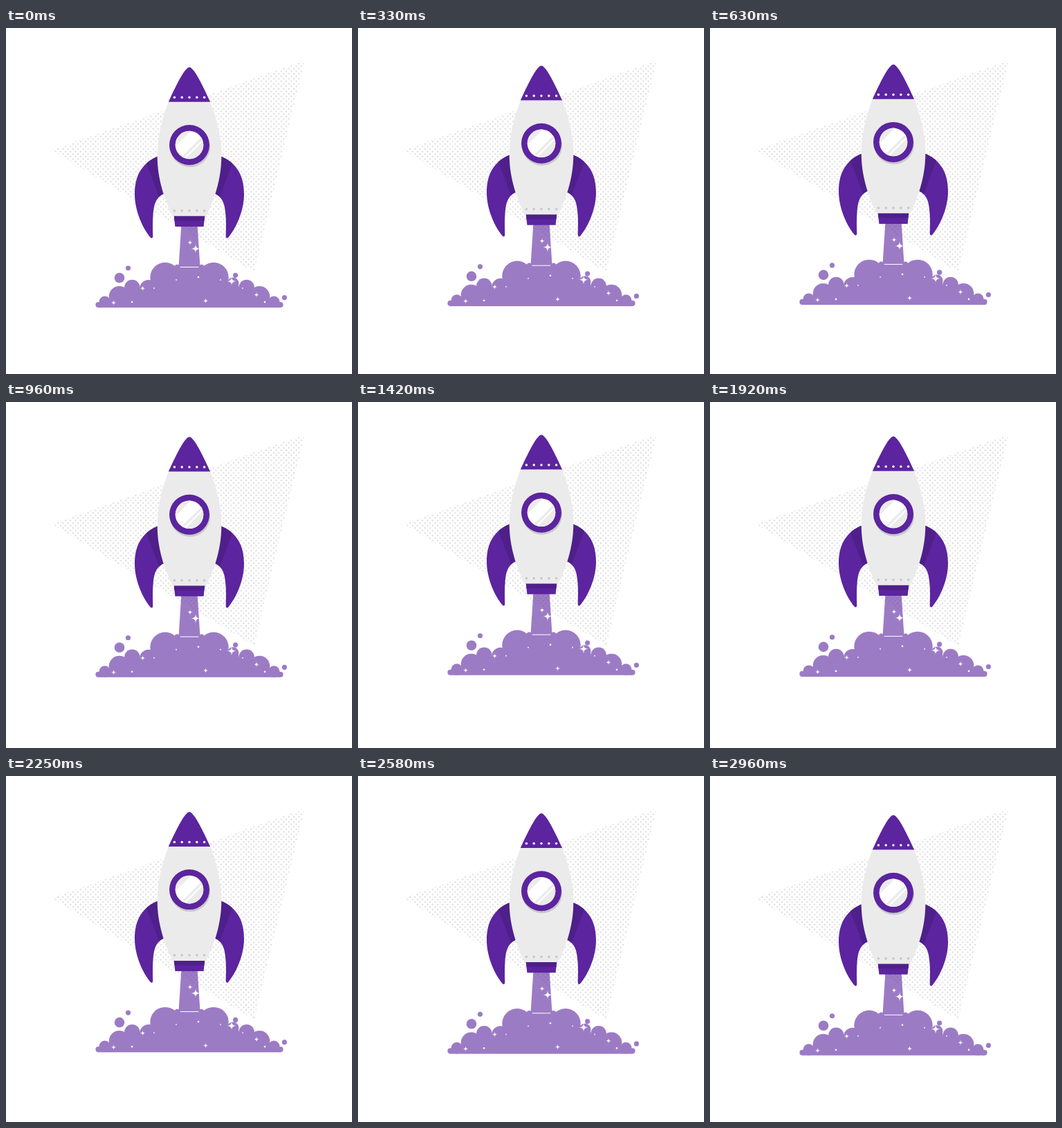
An HTML page that plays this animation: 500x500 px, repeating every 3 s.

```html
<!DOCTYPE html>
<html lang="en">
<head>
<meta charset="utf-8">
<title>Rocket</title>
<style>
  html, body { margin: 0; height: 100%; overflow: hidden; background: #fff; }
  svg { display: block; width: 100%; height: 100%; }
</style>
</head>
<body>
<svg viewBox="0 0 500 500">
  <defs>
    <pattern id="dots" x="66.1" y="173.2" width="7.25" height="7.25" patternUnits="userSpaceOnUse">
      <g fill="#dedede"><circle cx="1.8" cy="1.8" r="1.25"/><circle cx="5.425" cy="5.425" r="1.25"/></g>
    </pattern>
    <clipPath id="glass"><circle cx="265" cy="169" r="20.3"/></clipPath>
    <path id="finShape" d="M221 185C197 194 186 213 186 240C186 265 198 290 209 303Q212 305 212.3 301C212.3 296 211.5 283 212.6 270C213.6 258 215 245 229 239Z"/>
    <clipPath id="finClip"><use href="#finShape"/></clipPath>
    <g id="fin">
      <use href="#finShape" fill="#5c249f"/>
      <path d="M202 193L225 180L240 235L222 246Z" fill="#4f1f8a" clip-path="url(#finClip)"/>
    </g>
    <path id="star" d="M0 -1Q0 0 1 0Q0 0 0 1Q0 0 -1 0Q0 0 0 -1Z" fill="#fff"/>
  </defs>

  <path d="M66 176.5L431.5 47L358.5 352Z" fill="url(#dots)"/>

  <g id="ship">
    <g id="smoke" fill="#5c249f" opacity=".6">
      <path d="M253.3 286H276.7L280.5 345H249.5Z"/>
      <circle cx="164" cy="361" r="7.3"/>
      <circle cx="176.5" cy="347" r="3.6"/>
      <circle cx="331.6" cy="357.3" r="3.6"/>
      <circle cx="402.4" cy="389.6" r="3.6"/>
      <circle cx="328" cy="369" r="8.5"/>
    </g>
    <g id="sparks"></g>

    <use href="#fin"/>
    <use href="#fin" transform="matrix(-1 0 0 1 530 0)"/>
    <path d="M242.7 271H287.3L285.6 287H244.4Z" fill="#5c249f"/>
    <path d="M242.7 271H287.3L286.5 278.5H243.5Z" fill="#4f1f8a"/>
    <path d="M235 106.5C224 135 218.7 160 218.7 185C218.7 220 230 250 240.5 271.8H289.5C300 250 311.3 220 311.3 185C311.3 160 306 135 295 106.5Z" fill="#ebebeb"/>
    <path d="M234.8 106.8C244 87 258 56.8 265 56.8C272 56.8 286 87 295.2 106.8Z" fill="#5c249f"/>
    <g id="rivets"></g>

    <circle cx="266" cy="172" r="29" fill="#c8c8c8"/>
    <circle cx="265" cy="169" r="29" fill="#5c249f"/>
    <g clip-path="url(#glass)" fill="#ebebeb">
      <path d="M240 145H290V195H240Z" fill="#fff"/>
      <path d="M240 145H271L240 176Z"/>
      <path d="M245 195L290 150V155L250 195Z"/>
      <path d="M253 195L290 158V195Z"/>
    </g>
  </g>
</svg>
<script>
  const $ = id => document.getElementById(id);
  const add = (id, tag, attrs) => {
    const el = document.createElementNS('http://www.w3.org/2000/svg', tag);
    for (const key in attrs) el.setAttribute(key, attrs[key]);
    $(id).append(el);
  };
  const dot = (id, cx, cy, r, more) => add(id, 'circle', { cx, cy, r, ...more });
  const star = (size, ...places) => places.forEach(([x, y]) =>
    add('sparks', 'use', { href: '#star', transform: `translate(${x} ${y}) scale(${size})` }));

  // One half of the cloud as puffs (distance from the axis, y, radius), mirrored about it
  const half = [[131.5, 400, 4.1], [122.2, 395.8, 8.3], [101.3, 388, 15], [82.7, 375, 11.2],
                [59, 377, 13], [35, 360.5, 21.7], [17.5, 346, 4.3]];
  const mirrored = half.map(([d, y, r]) => [-d, y, r]).reverse();
  const puffs = [...mirrored.reverse(), ...half.reverse()].map(([d, y, r]) => [265 + d, y, r]);
  puffs.forEach(p => dot('smoke', ...p));
  const ridge = puffs.map(([x, y]) => `${x},${y}`).join(' ');
  add('smoke', 'polygon', { points: `133.5,404.1 ${ridge} 396.5,404.1` });

  star(6.5, [274, 319], [326, 366]);
  star(4, [266, 310], [197.5, 376.3], [155.5, 397], [288.5, 394.3], [362, 385.5]);
  // Specks follow the slope of the cloud
  for (let i = -3; i <= 3; i++)
    dot('sparks', 278 + i * 32, 360 + 4 * i * i, i % 3 ? .9 : 1.3, { fill: '#fff' });

  for (let i = -2; i <= 2; i++) {
    dot('rivets', 265 + i * 10.8, 100.3, 1.75, { fill: '#fff' });
    dot('rivets', 265 + i * 10.8, 264, 1.75, { fill: '#c6c6c6' });
  }

  // 72 steps per 3 s loop: rise for half of it, then sink back
  const start = performance.now();
  function draw() {
    const t = (performance.now() - start) % 3000;
    const step = Math.floor((t + 5) * .024) % 72;
    const rise = 9.8 * (1 - Math.abs(step - 36) / 36);
    $('ship').setAttribute('transform', `translate(0 ${-rise})`);
    requestAnimationFrame(draw);
  }
  draw();
</script>
</body>
</html>
```
